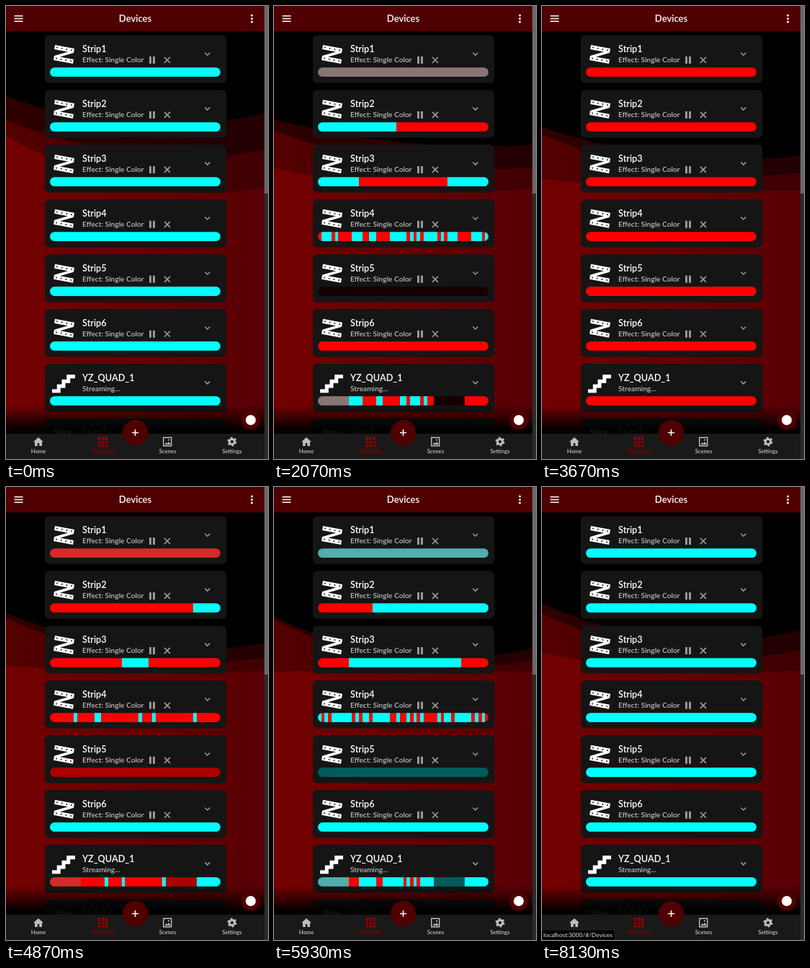
Write an HTML page with a canvas that moves like this. It is 364x628 px and loops after 8.19 s.

```html
<!DOCTYPE html>
<html lang="en">
<head>
<meta charset="utf-8">
<title>Devices</title>
<style>
  html, body { margin: 0; width: 100%; height: 100%; overflow: hidden; background: #000; }
  canvas, svg { position: absolute; left: 0; top: 0; width: 364px; height: 628px; }
  text { font-family: Lato, "Open Sans", sans-serif; font-weight: 600; fill: #fff; }
  .title { font-size: 13px; }
  .name { font-size: 12.7px; }
  .sub { font-size: 10.2px; fill: #bdbdbd; }
  .nav { font-size: 7.7px; fill: #c4c4c4; text-anchor: middle; }
  .nav.on { font-size: 9.1px; fill: #8e0000; }
  #tip { opacity: 0; }
  #tip text { font-size: 8.4px; font-weight: 400; fill: #e8e8e8; }
</style>
</head>
<body>
<canvas id="waves" width="364" height="628"></canvas>
<svg viewBox="0 0 364 628">
  <defs>
    <linearGradient id="fade" x2="0" y2="1">
      <stop offset="0" stop-color="#000" stop-opacity="0"/>
      <stop offset=".85" stop-color="#000" stop-opacity=".95"/>
    </linearGradient>
    <g id="strip">
      <path fill="#fff" d="M2 0 29 5 28 11 9 16.500 28 20 27 26 0 21 1 15 20 9.500 1 6Z"/>
      <path fill="none" stroke="#151515" stroke-width="2" stroke-linecap="round" stroke-dasharray="0 6.800"
        d="M5 3.600 26 7.500M4 18.600 25 22.500"/>
    </g>
    <path id="stairs" fill="#fff" d="M15 5V9H11V13H7V17H3V20H10V16H14V12H18V8H22V5Z"/>
    <g id="controls">
      <path fill="#999" d="M199 70h3v10h-3zM204 70h3v10h-3z"/>
      <path stroke="#999" stroke-width="1.700" d="m220 71 8 8m0-8-8 8"/>
    </g>
  </defs>
  <g id="cards"></g>

  <path fill="#500000" d="M0 0h359v35.300H0z"/>
  <path stroke="#fff" stroke-width="1.500" d="M11.500 13.700h12m-12 3.800h12m-12 3.800h12"/>
  <text class="title" x="179.500" y="22" text-anchor="middle">Devices</text>
  <path stroke="#fff" stroke-width="3" stroke-linecap="round" stroke-dasharray="0 4.500" d="M341.500 13v9.100"/>

  <path fill="url(#fade)" d="M0 553h359v40H0z"/>
  <circle cx="340" cy="574.500" r="13" fill="#500000"/>
  <circle cx="340" cy="574" r="7" fill="#fff"/>

  <path fill="#191919" d="M0 593h359v35H0z"/>
  <path fill="#bdbdbd" d="m45 598 7 6.300h-2v5.700h-3.700v-4h-2.600v4H40v-5.700h-2z"/>
  <text class="nav" x="45" y="619.500">Home</text>
  <path stroke="#8e0000" stroke-width="3.600" stroke-dasharray="5 1.200 3 1.200" d="M129.500 597v14m5-14v14m5-14v14"/>
  <text class="nav on" x="134.500" y="620">Devices</text>
  <path fill="none" stroke="#bdbdbd" stroke-width="1.400" d="M218.700 601v-2.800h3m5 0h3v2.800m0 6v2.800h-3m-5 0h-3V607m0-6v6m11-6v6m-8-8.800h5m-5 11.600h5"/>
  <path fill="#bdbdbd" d="m220.500 608 2.300-3 1.500 1.800 2-2.700 2.500 3.900z"/><circle cx="226" cy="601.500" r="1.100" fill="#bdbdbd"/>
  <text class="nav" x="224.500" y="619.500">Scenes</text>
  <circle cx="314" cy="604" r="3.600" fill="none" stroke="#bdbdbd" stroke-width="3"/>
  <circle cx="314" cy="604" r="5.500" fill="none" stroke="#bdbdbd" stroke-width="2" stroke-dasharray="2.880"/>
  <text class="nav" x="314" y="619.500">Settings</text>
  <circle cx="179.500" cy="591.400" r="17.700" fill="#500000"/>
  <path stroke="#fff" stroke-width="1.500" d="M175 591.500h9m-4.500-4.500v9"/>

  <path fill="#2b2b2b" d="M359 0h5v628h-5z"/>
  <path fill="#686868" d="M359 0h5v260h-5z"/>
  <g id="tip">
    <path fill="#000" stroke="#333" stroke-width=".6" d="M0 614h98q3 0 3 3v11H0z"/>
    <text x="2" y="624">localhost:3000/#/Devices</text>
  </g>
</svg>
<canvas id="bars" width="364" height="628"></canvas>
<script>
const LOOP = 8190, STEP = LOOP / 123, PITCH = 75.95, CELLS = 50;
const FADE = 2070, STARTS = [944, 4518];
const CYAN = [0, 255, 255], RED = [255, 0, 0], BLACK = [0, 0, 0];
const $ = id => document.getElementById(id);
const wave = $("waves").getContext("2d"), bar = $("bars").getContext("2d");
const clamp = v => Math.min(1, Math.max(0, v));
const lerp = (a, b, k) => a + (b - a) * k;
const mix = (a, b, k) => a.map((v, i) => lerp(v, b[i], k));

function card(i) {
  const stream = i === 6;
  const icon = stream
    ? '<use href="#stairs" transform="translate(59 47) scale(1.68)"/>'
    : '<use href="#strip" x="66" y="54"/>';
  return `<g transform="translate(0 ${i * PITCH})">
    <rect x="54" y="40.400" width="252.200" height="66.300" rx="6" fill="#151515"/>${icon}
    <text class="name" x="106" y="64.200">${stream ? "YZ_QUAD_1" : "Strip" + Math.min(i + 1, 7)}</text>
    <text class="sub" x="106" y="78">${stream ? "Streaming..." : "Effect: Single Color"}</text>
    ${stream ? "" : '<use href="#controls"/>'}
    <path d="m276.300 64.700 3.500 3.500 3.500-3.500" fill="none" stroke="#999" stroke-width="1.500"/></g>`;
}
$("cards").innerHTML = Array.from({ length: 8 }, (_, i) => card(i)).join("");

// Layer heights at the left, middle and right: first pose and turning pose
const TURN = 6000;
const LAYERS = [
  { alpha: .4, from: [125, 165, 148], to: [180, 235, 224] },
  { alpha: .53, from: [158, 205, 200], to: [184, 245, 240] },
  { alpha: 1, from: [180, 250, 252], to: [256, 256, 256] }
];
const tint = wave.createLinearGradient(0, 0, 359, 0);
tint.addColorStop(0, "#740000");
tint.addColorStop(1, "#580004");

function drawWaves(t) {
  const k = t < TURN ? t / TURN : 1 - .35 * (t - TURN) / (LOOP - TURN);
  const edge = t < TURN ? Math.sqrt(k) : k;
  wave.globalAlpha = 1;
  wave.fillStyle = "#000";
  wave.fillRect(0, 0, 364, 628);
  wave.fillStyle = tint;
  for (const { alpha, from, to } of LAYERS) {
    const [left, mid, right] = from.map((y, i) => lerp(y, to[i], i === 1 ? k : edge));
    wave.globalAlpha = alpha;
    wave.beginPath();
    wave.moveTo(0, 628);
    wave.lineTo(0, left);
    wave.quadraticCurveTo(179.5, 2 * mid - (left + right) / 2, 359, right);
    wave.lineTo(359, 628);
    wave.fill();
  }
}

const noise = i => Math.abs(Math.sin(i * 127.1 + 4.7) * 43758.5453) % 1;

// Each effect gives the colour of cell i of n while going from a to b
const EFFECTS = [
  (a, b, p) => mix(a, b, p),
  (a, b, p, i, n) => i >= n - Math.floor(p * n) ? b : a,
  (a, b, p, i, n) => Math.abs(i - n / 2 + .25) < p * n * .48 ? b : a,
  (a, b, p, i) => noise(i) < p ** 1.5 ? b : a,
  (a, b, p) => p < .5 ? mix(a, BLACK, p * 2) : mix(BLACK, b, p * 2 - 1),
  (a, b, p) => p > 0 ? b : a
];

// All six effects side by side
function combined(a, b, p, i, n) {
  const start = s => Math.min(n, Math.round(s * 8.6));
  const s = EFFECTS.findIndex((_, e) => i < start(e + 1));
  return EFFECTS[s](a, b, p, i - start(s), start(s + 1) - start(s));
}

function drawBars(t) {
  const second = t >= STARTS[1];
  const [from, to] = second ? [RED, CYAN] : [CYAN, RED];
  const p = clamp((t - STARTS[+second]) / FADE);
  const a = p < 1 ? from : to;
  bar.clearRect(0, 0, 364, 628);
  [...EFFECTS, combined].forEach((effect, row) => {
    const y = 85.3 + row * PITCH;
    bar.save();
    bar.beginPath();
    bar.roundRect(61, y, 237, 12.8, 6.4);
    bar.clip();
    for (let i = 0; i < CELLS; i++) {
      const x = Math.round(61 + i * 4.74), end = Math.round(61 + (i + 1) * 4.74);
      bar.fillStyle = `rgb(${effect(a, to, p, i, CELLS).map(Math.round)})`;
      bar.fillRect(x, y - 1, end - x, 15);
    }
    bar.restore();
  });
}

const origin = performance.now();
function frame() {
  const now = (performance.now() - origin) % LOOP;
  // Frame starts fall on tens of ms, hence the small lead
  const t = Math.floor((now + 5) / STEP) * STEP % LOOP;
  drawWaves(t);
  drawBars(t);
  $("tip").style.opacity = clamp((t - 7700) / 250);
  requestAnimationFrame(frame);
}
frame();
</script>
</body>
</html>
```
